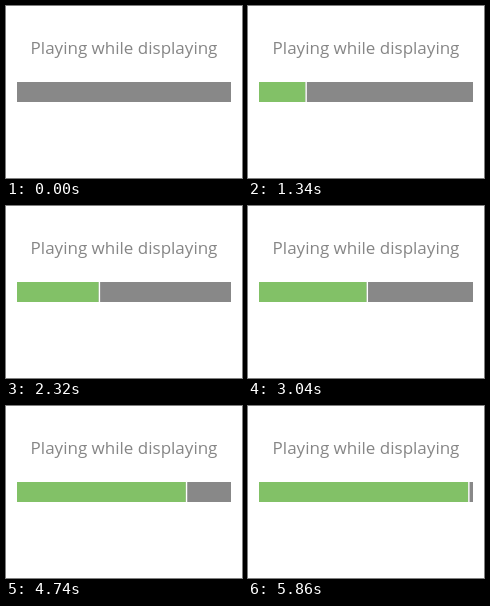
Animation, 236 px wide and 172 px high, one loop 5880 ms. Source, as an HTML page:

```html
<!DOCTYPE html>
<html lang="en">
<head>
<meta charset="utf-8">
<title>Progress bar</title>
<style>
  html, body { margin: 0; width: 100%; height: 100%; overflow: hidden; background: #fff; }
  svg { display: block; }
  text { font: 17px "Open Sans", "Noto Sans", sans-serif; fill: #868686; }
</style>
</head>
<body>
<svg width="236" height="172" viewBox="0 0 236 172">
  <text x="24.6" y="48">Playing while displaying</text>
  <rect x="11" y="76" width="214" height="20" fill="#888"/>
  <rect id="played" x="11" y="76" width="0" height="20" fill="#82c167"/>
  <rect id="head" x="11" y="76" width="0" height="20" fill="#fff"/>
</svg>
<script>
  const LOOP = 5880, STEP = 20, LEFT = 11, HEAD = 1.4;
  const played = document.getElementById("played");
  const head = document.getElementById("head");

  function draw(now) {
    const t = Math.floor((now % LOOP) / STEP) * STEP;
    const x = 9.2 + 0.036 * t; // left edge of the playhead
    const start = Math.max(LEFT, x);
    played.setAttribute("width", start - LEFT);
    head.setAttribute("x", start);
    head.setAttribute("width", Math.max(0, x + HEAD - start));
    requestAnimationFrame(draw);
  }
  requestAnimationFrame(draw);
</script>
</body>
</html>
```
